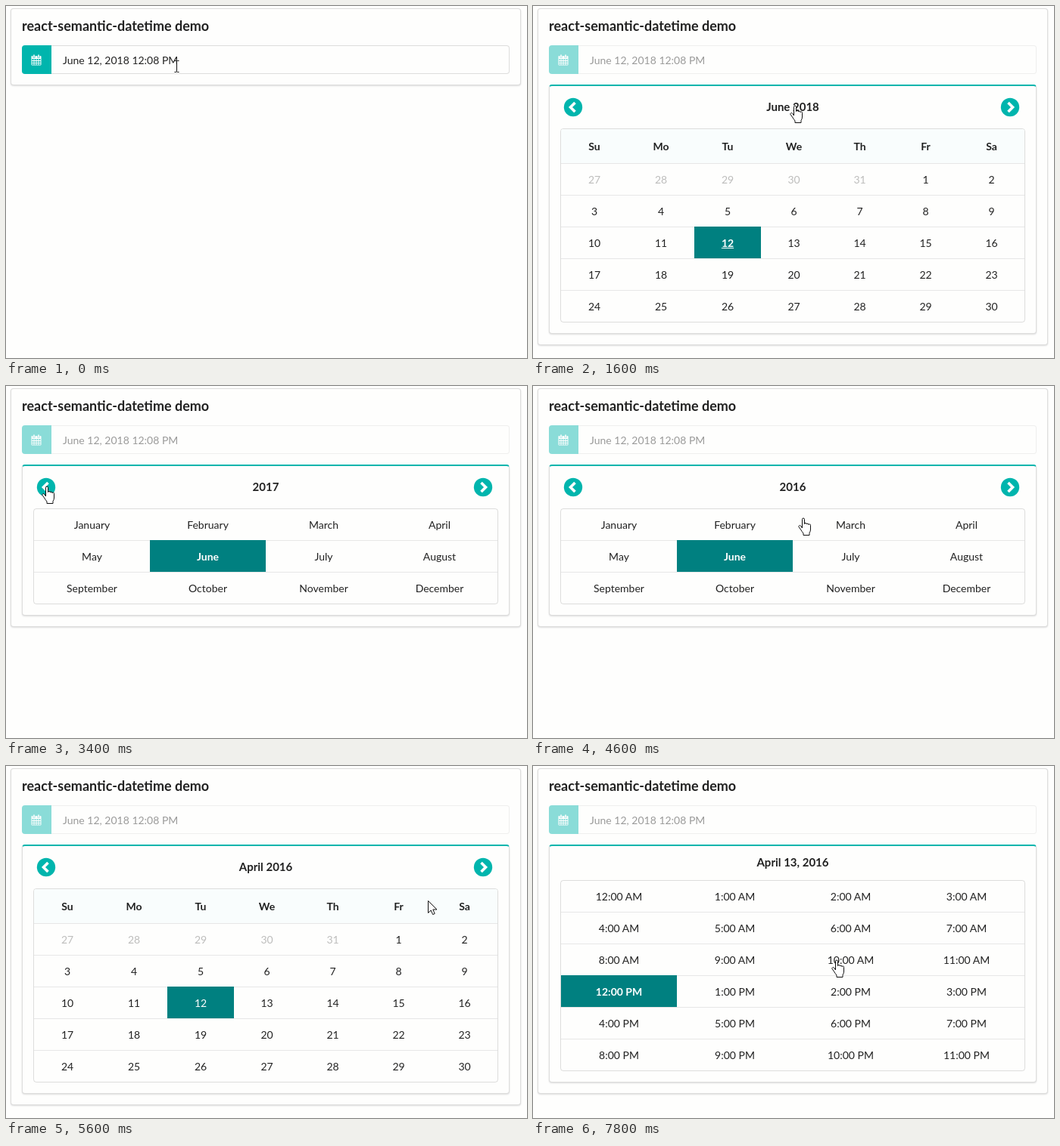
Animation of 688 by 466 pixels, one loop 8 s. Source, as an HTML page:

```html
<!DOCTYPE html>
<html lang="en">
<head>
<meta charset="utf-8">
<title>Date and time picker</title>
<style>
  * { box-sizing: border-box; }
  html, body { margin: 0; width: 100%; height: 100%; overflow: hidden; background: #fefefd; }
  #stage {
    position: relative; width: 688px; height: 466px; overflow: hidden;
    font: 14px/17px Lato, sans-serif; color: rgba(0,0,0,.87);
  }
  #stage > *, .view > * { position: absolute; }
  .segment, .panel {
    background: #fefefd; border: 1px solid rgba(34,36,38,.15); border-radius: 4px;
    box-shadow: 0 1px 2px rgba(34,36,38,.15);
  }
  .segment { left: 6px; top: 3px; width: 674px; }
  .panel { left: 21px; top: 104px; width: 644px; border-top: 2px solid #00b5ad; }
  h3 { left: 21px; top: 15px; margin: 0; font: 700 18px/22px Lato, sans-serif; white-space: nowrap; }
  .field { left: 21px; top: 52px; width: 644px; height: 38px; }
  .field.off { opacity: .45; }
  .button { position: absolute; width: 39px; height: 38px; background: #00b5ad; border-radius: 4px 0 0 4px; }
  .button svg { position: absolute; left: 12px; top: 12px; }
  .input {
    position: absolute; left: 39px; width: 605px; height: 38px; padding: 10px 15px;
    border: 1px solid rgba(34,36,38,.15); border-left: 0; border-radius: 0 4px 4px 0;
  }
  .view { left: 0; top: 0; display: none; }
  .view.on { display: block; }
  .label { left: 37px; width: 612px; text-align: center; font: 700 15px/18px Lato, sans-serif; }
  .grid {
    left: 36px; width: 614px; display: grid; overflow: hidden;
    border: 1px solid rgba(34,36,38,.15); border-radius: 4px;
  }
  .cell {
    display: flex; align-items: center; justify-content: center;
    height: 42px; border-top: 1px solid rgba(34,36,38,.1);
  }
  .cell.first { height: 41px; border-top: 0; }
  .cell.head { height: 45px; border-top: 0; font-weight: 700; background: #f9fdfd; }
  .cell.dim { color: rgba(40,40,40,.3); }
  .cell.active { background: #008080; border-color: #008080; color: #fff; }
  .cell.bold { font-weight: 700; }
  .today .cell.active { font-weight: 700; text-decoration: underline; }
  #cursor { left: 0; top: 0; overflow: visible; }
  #cursor path { fill: #fff; stroke: #111; stroke-width: 1; stroke-linejoin: round; }
  #cursor #beam { fill: none; }
</style>
</head>
<body>
<div id="stage">
  <div class="segment"></div>
  <h3>react-semantic-datetime demo</h3>
  <div class="field">
    <div class="button">
      <svg width="14" height="15">
        <rect x=".5" y="2" width="13" height="12.5" rx="1" fill="#fff"/>
        <path d="M1.5 7h11M1.5 10h11M1.5 12.7h11" stroke="#00b5ad" stroke-width="2"
          stroke-dasharray="2 1"/>
        <path d="M4 .5v4M10 .5v4" stroke="#00b5ad" stroke-width="3"/>
        <path d="M4 .5v3.5M10 .5v3.5" stroke="#fff" stroke-width="1.6"/>
      </svg>
    </div>
    <div class="input">June 12, 2018 12:08 PM</div>
  </div>
  <svg id="cursor" width="1" height="1">
    <path id="hand" d="M-1.5 13V1.5a1.5 1.5 0 0 1 3 0V7.6a1.4 1.4 0 0 1 2.8 .4a1.4 1.4 0 0 1 2.7 .7a1.3 1.3 0 0 1 2.5 .6V15q0 2.5-1.5 4.5V22.5H0V20Q-2 17.5-3.5 15L-6 11.5a1.5 1.5 0 0 1 2.4-1.6z"/>
    <path id="arrow" d="M.5.5V16.5L4.2 13l2.4 5.6 2.6-1.1L6.8 12H12z"/>
    <path id="beam" d="M-2.5-7.5H-.5L.5-7l1-.5h2M.5-7V7M-2.5 7.5H-.5L.5 7l1 .5h2"/>
  </svg>
</div>
<script>
const LOOP = 8000, STEP = 200;
const stage = document.getElementById('stage');
const segment = stage.querySelector('.segment');
const field = stage.querySelector('.field');
const cursor = document.getElementById('cursor');

const chevron = (x, dir) => `<svg style="left:${x - 13}px;top:121px" width="26" height="26">
  <g transform="translate(13 13) scale(${dir} 1)"><circle r="12.2" fill="#00b5ad"/>
  <path d="M2.5-6L-3.5 0L2.5 6" fill="none" stroke="#fff" stroke-width="3.6"/></g></svg>`;

// bottom: lower edge of the grid; cellTop: where clickable cells begin
function makeView({ top, bottom, cellTop = top, columns, cells, arrows = true }) {
  const el = document.createElement('div');
  el.className = 'view';
  el.innerHTML = `<div class="panel" style="height:${bottom - 89}px"></div>
    ${arrows ? chevron(52.5, 1) + chevron(629.5, -1) : ''}
    <div class="label" style="top:${arrows ? 124 : 118}px"></div>
    <div class="grid" style="top:${top}px;height:${bottom - top}px;grid-template-columns:${columns}">
    ${cells.map(([text, cls]) => `<div class="cell ${cls}">${text}</div>`).join('')}</div>`;
  stage.insertBefore(el, cursor);
  return { el, label: el.querySelector('.label'), top, bottom, cellTop, arrows };
}

const fourWide = (texts, active) => texts.map((text, i) =>
  [text, (i < 4 ? 'first ' : '') + (i === active ? 'active bold' : '')]);

const dayCells = [...'Su Mo Tu We Th Fr Sa'.split(' ').map(d => [d, 'head'])];
for (let i = 0; i < 35; i++) {
  const day = i < 5 ? 27 + i : i - 4;
  dayCells.push([day, i < 5 ? 'dim' : day === 12 ? 'active' : '']);
}
const months = 'January February March April May June July August September October November December'.split(' ');
const hours = Array.from({ length: 24 }, (_, h) => `${h % 12 || 12}:00 ${h < 12 ? 'AM' : 'PM'}`);

const views = {
  days: makeView({ top: 162, bottom: 419, cellTop: 208, columns: 'repeat(3,88px) repeat(4,87px)', cells: dayCells }),
  months: makeView({ top: 162, bottom: 289, columns: 'repeat(4,153px)', cells: fourWide(months, 5) }),
  hours: makeView({ top: 151, bottom: 404, columns: 'repeat(4,153px)', cells: fourWide(hours, 12), arrows: false })
};

// start time, view, label
const scenes = [
  [0, null, ''], [800, 'days', 'June 2018'], [2200, 'months', '2018'], [3400, 'months', '2017'],
  [3800, 'months', '2016'], [5600, 'days', 'April 2016'], [7400, 'hours', 'April 13, 2016']
];

// time, x, y of the pointer tip
const path = [
  [0, 225, 80], [600, 42, 73], [800, 42, 73], [1400, 340, 131], [1600, 346, 132], [2200, 346, 132],
  [3000, 54, 133], [4200, 54, 133], [4600, 357, 175], [5400, 557, 178], [5600, 557, 178],
  [6200, 520, 225], [7000, 435, 269], [7200, 348, 309], [7400, 348, 309], [7800, 401, 257]
];

function pointerAt(t) {
  const i = path.findIndex(p => p[0] > t);
  if (i < 0) return path[path.length - 1].slice(1);
  const [t0, x0, y0] = path[i - 1], [t1, x1, y1] = path[i];
  const u = (t - t0) / (t1 - t0), k = u * u * (3 - 2 * u);
  return [Math.round(x0 + (x1 - x0) * k), Math.round(y0 + (y1 - y0) * k)];
}

function pointerKind(view, x, y) {
  if (!view) {
    if (y < 52 || y > 90 || x < 21 || x > 665) return 'arrow';
    return x < 60 ? 'hand' : 'beam';
  }
  const onCell = x > 36 && x < 650 && y > view.cellTop && y < view.bottom;
  const onBar = view.arrows && y > 120 && y < 147 &&
    (Math.abs(x - 52) < 13 || Math.abs(x - 630) < 13 || Math.abs(x - 343) < 36);
  return onCell || onBar ? 'hand' : 'arrow';
}

function draw(t) {
  const [, name, label] = scenes.filter(s => s[0] <= t).pop();
  const view = views[name];
  for (const key in views) views[key].el.classList.toggle('on', key === name);
  if (view) {
    view.label.textContent = label;
    view.el.classList.toggle('today', label === 'June 2018');
  }
  segment.style.height = (view ? view.bottom + 27 : 102) + 'px';
  field.classList.toggle('off', !!view);

  const [x, y] = pointerAt(t), kind = pointerKind(view, x, y);
  cursor.style.transform = `translate(${x}px,${y}px)`;
  for (const shape of cursor.children) shape.style.display = shape.id === kind ? '' : 'none';
}

let last = -1;
function loop(now) {
  const t = Math.floor(now % LOOP / STEP) * STEP;
  if (t !== last) draw(last = t);
  requestAnimationFrame(loop);
}
draw(0);
requestAnimationFrame(loop);
</script>
</body>
</html>
```
